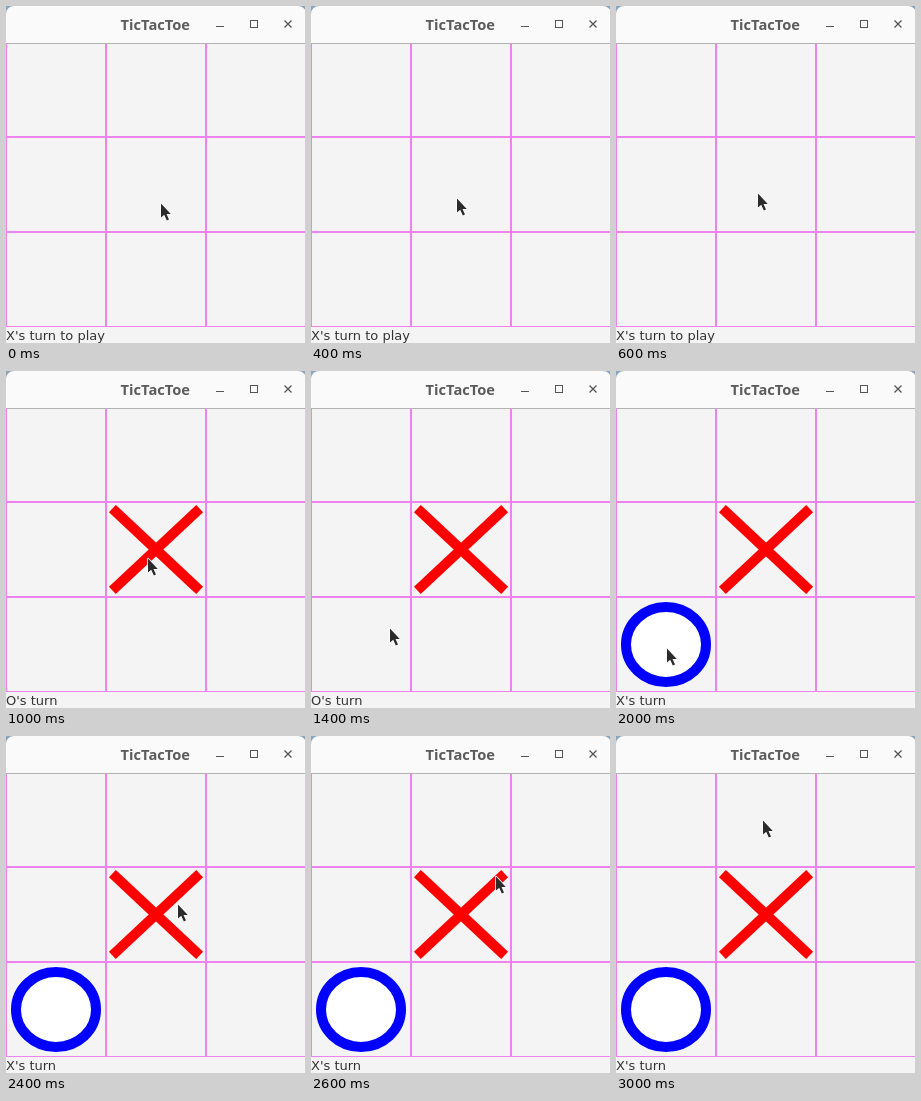
An HTML page that plays this animation: 299x337 px, repeating every 8000 ms.

```html
<!DOCTYPE html>
<html lang="en">
<head>
<meta charset="utf-8">
<title>TicTacToe</title>
<style>
  html, body { margin: 0; width: 100%; height: 100%; overflow: hidden; background: #f4f4f4; }
  svg { display: block; width: 299px; height: 337px; }

  .title { font: bold 14.67px "Open Sans", "Noto Sans", sans-serif; fill: #5c5c5c; text-anchor: middle; }
  .status { font: 13px "DejaVu Sans", sans-serif; fill: #333; }
  .grid { fill: none; stroke: #ee82ee; shape-rendering: crispEdges; }
  .buttons { fill: none; stroke: #555; }

  /* Every change is a hard cut */
  .anim { animation: 8s step-end infinite; }
  .cross { animation-name: cross; }
  .ring { animation-name: ring; }
  .first { animation-name: first; }
  .second { animation-name: second; }
  .cursor { animation-name: move; }

  @keyframes cross { 0% { visibility: hidden; } 12.5%, 100% { visibility: visible; } }
  @keyframes ring { 0% { visibility: hidden; } 25%, 100% { visibility: visible; } }
  @keyframes first { 0% { visibility: visible; } 12.5%, 100% { visibility: hidden; } }
  @keyframes second {
    0% { visibility: hidden; }
    12.5% { visibility: visible; }
    25%, 100% { visibility: hidden; }
  }
  @keyframes move {
    0% { transform: translate(153px, 197px); }
    5% { transform: translate(144px, 192px); }
    7.5% { transform: translate(140px, 187px); }
    15% { transform: translate(114px, 232px); }
    17.5% { transform: translate(77px, 257px); }
    20% { transform: translate(50px, 277px); }
    22.5% { transform: translate(49px, 277px); }
    27.5% { transform: translate(68px, 268px); }
    30% { transform: translate(170px, 168px); }
    32.5% { transform: translate(183px, 140px); }
    35% { transform: translate(156px, 95px); }
    37.5%, 100% { transform: translate(145px, 84px); }
  }
</style>
</head>
<body>
<svg viewBox="0 0 299 337">
  <!-- Desktop corners and title bar -->
  <rect width="299" height="20" fill="#8ca5bb"/>
  <path d="M0 37V8A8 8 0 0 1 8 0H292A8 8 0 0 1 300 8V37Z" fill="#fafafa"/>
  <text class="title" x="149.3" y="24">TicTacToe</text>
  <g class="buttons">
    <path d="M210 20.5H218"/>
    <rect x="244.5" y="14.5" width="7" height="7"/>
    <path d="M278.5 14.5L285.5 21.5M285.5 14.5L278.5 21.5" stroke-width="1.3"/>
  </g>

  <!-- Board -->
  <rect y="37" width="299" height="300" fill="#f4f4f4"/>
  <g class="grid">
    <path d="M.5 37V321M0 320.5H299"/>
    <path d="M100 37V321M200 37V321M0 131H299M0 226H299" stroke-width="2"/>
  </g>
  <rect y="37" width="299" height="1" fill="#b5b0b5"/>
  <path class="anim cross" d="M110 141L190 216M190 141L110 216" stroke="#f00" stroke-width="10" stroke-linecap="square"/>
  <ellipse class="anim ring" cx="50" cy="273.5" rx="40" ry="37.5" fill="#fff" stroke="#00f" stroke-width="10"/>

  <g class="status">
    <text class="anim first" y="334">X's turn to play</text>
    <text class="anim second" y="334">O's turn</text>
    <text class="anim ring" y="334">X's turn</text>
  </g>

  <g class="anim cursor">
    <path d="M2 .5V14.5L5.2 11.7L7.8 17.6L10 16.6L7.5 11H11.8Z" fill="#2b2b2b" stroke="#fff" stroke-width="1.6" stroke-linejoin="round" paint-order="stroke"/>
  </g>
</svg>
</body>
</html>
```
